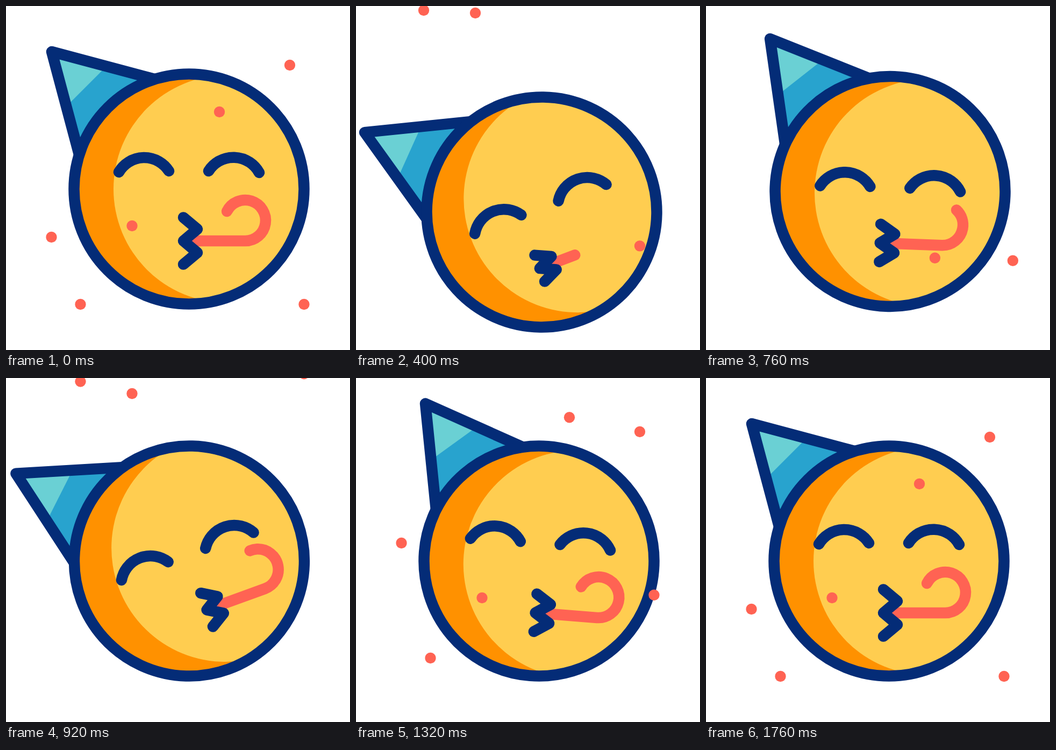
Recreate the animation shown at these times as an HTML page. Size 640x640 px, loop 2 s.

```html
<!DOCTYPE html>
<html lang="en">
<head>
<meta charset="utf-8">
<title>Party face</title>
<style>
  html, body { margin: 0; height: 100%; overflow: hidden; background: #fff; }
  svg { display: block; width: 100vw; height: 100vh; }
  .line { fill: none; stroke: #042c77; stroke-width: 20.5; stroke-linecap: round; stroke-linejoin: round; }
  #horn { stroke: #ff6353; }
</style>
</head>
<body>
<svg viewBox="0 0 640 640">
  <clipPath id="disc"><circle cx="340.5" cy="340.5" r="214"/></clipPath>
  <g id="head">
    <g id="hat">
      <path fill="#28a3ce" d="M85 85L290 140 140 290Z"/>
      <path fill="#6ad0d4" d="M85 85L189 110 110 189Z"/>
      <path class="line" d="M280 137L85 85 137 280"/>
    </g>
    <circle cx="340.5" cy="340.5" r="214" fill="#ff9100"/>
    <circle cx="412" cy="340.5" r="212" fill="#ffcd50" clip-path="url(#disc)"/>
    <circle class="line" cx="340.5" cy="340.5" r="214"/>
    <path id="eyes" class="line" d="M210 309A54.6 54.6 0 0 1 303 307M377 307A54.6 54.6 0 0 1 471 310"/>
    <path id="horn" class="line" d="M345 437H445A38 38 0 1 0 411 382"/>
    <polyline id="mouth" class="line"/>
  </g>
  <g id="dots" fill="#ff6353"></g>
</svg>
<script>
const LOOP = 2000, STEP = 40, CENTER = 340.5, TOP = -20;
const $ = id => document.getElementById(id);
const set = (el, attrs) => Object.entries(attrs).forEach(([k, v]) => el.setAttribute(k, v));
const clamp = u => Math.min(1, Math.max(0, u));
const smooth = u => u * u * (3 - 2 * u);

// Smooth curve through [time, value] keys: a brisk start, flat at peaks and at the end.
function curve(...keys) {
  const last = keys.length - 1;
  const rate = i => (keys[i + 1][1] - keys[i][1]) / (keys[i + 1][0] - keys[i][0]);
  const slope = keys.map((_, i) => {
    if (i === 0) return rate(0) * 0.8;
    if (i === last) return 0;
    const a = rate(i - 1), b = rate(i);
    return a * b > 0 ? 2 * a * b / (a + b) : 0;
  });
  return t => {
    if (t >= keys[last][0]) return keys[last][1];
    const i = keys.findIndex(k => k[0] > t) - 1;
    const [t0, v0] = keys[i], [t1, v1] = keys[i + 1];
    const d = t1 - t0, u = (t - t0) / d, w = 1 - u;
    return v0 + (v1 - v0) * smooth(u) + d * u * w * (slope[i] * w - slope[i + 1] * u);
  };
}

// The head leans in to breathe, throws itself forward to blow, and settles.
const headX = curve([0, 0], [400, 5], [1040, 0]);
const headY = curve([0, 0], [160, 25.5], [400, 43], [850, 0]);
const tilt = curve([0, 0], [460, -21.5], [740, 3], [920, -20], [1210, 5.2], [1720, 0]);
const eyeDrop = curve([0, 0], [400, 25], [780, 26], [1320, 0]);
const mouthX = curve([0, 0], [160, -16.5], [400, -30], [1080, 16.6], [1720, 0]);
const pucker = curve([0, 1], [400, .6], [760, .805], [1080, .716], [1720, 1]);
const hornLength = curve([0, 262], [400, 55], [760, 192], [1320, 262]);

// The hat wobbles once for each upward swing.
const hatTilt = t => t > 480 && t < 1600 ? 4.6 * Math.sin(Math.PI * (t - 480) / 560) ** 2 : 0;

// Each dot drops away, then falls in again from the top.
const confetti = [
  { x: 84.5, rest: 430, speed: 124, start: 1005, time: 480 },
  { x: 138.5, rest: 555, speed: 120, start: 848, time: 554 },
  { x: 234.5, rest: 409, speed: 75, start: 819, time: 480 },
  { x: 397, rest: 197, speed: 220, start: 1224, time: 212 },
  { x: 528, rest: 110, speed: 95, start: 1038, time: 340 },
  { x: 554.5, rest: 555, speed: 87, start: 860, time: 693 }
];

// Two more dots blow diagonally across the stage.
const gust = [{ x: 126, y: 8, vx: .833 }, { x: 222, y: 13, vx: .969 }];

const dots = [...confetti, ...gust].map(() => {
  const dot = document.createElementNS("http://www.w3.org/2000/svg", "circle");
  set(dot, { r: 10.2 });
  return $("dots").appendChild(dot);
});

function draw(t) {
  const dx = mouthX(t), squeeze = pucker(t), bulge = 26 * (1.2 - .2 * squeeze);
  set($("head"), {
    transform: `translate(${headX(t)} ${headY(t)}) rotate(${tilt(t)} ${CENTER} ${CENTER})`
  });
  set($("hat"), { transform: `rotate(${hatTilt(t)} ${CENTER} ${CENTER})` });
  set($("eyes"), { transform: `translate(0 ${eyeDrop(t)})` });
  set($("horn"), {
    transform: `translate(${dx} 0)`,
    "stroke-dasharray": `${hornLength(t)} 999`
  });
  set($("mouth"), {
    points: [-2, -1, 0, 1, 2].map(i =>
      `${330 + dx + (i % 2 ? bulge : 0)},${437 + 21.8 * i * squeeze}`).join(" ")
  });

  const places = [
    ...confetti.map(({ x, rest, speed, start, time }) => [x, t < 800
      ? rest + speed * (t / 160) ** 1.38
      : TOP + (rest - TOP) * smooth(clamp((t - start) / time))]),
    ...gust.map(({ x, y, vx }) => [x + vx * (t - 400), y + 1.28 * (t - 400)])
  ];
  places.forEach(([cx, cy], i) => set(dots[i], { cx, cy }));
}

const begin = performance.now();
function frame() {
  const t = (performance.now() - begin) % LOOP;
  draw(Math.floor(t / STEP) * STEP);
  requestAnimationFrame(frame);
}
frame();
</script>
</body>
</html>
```
